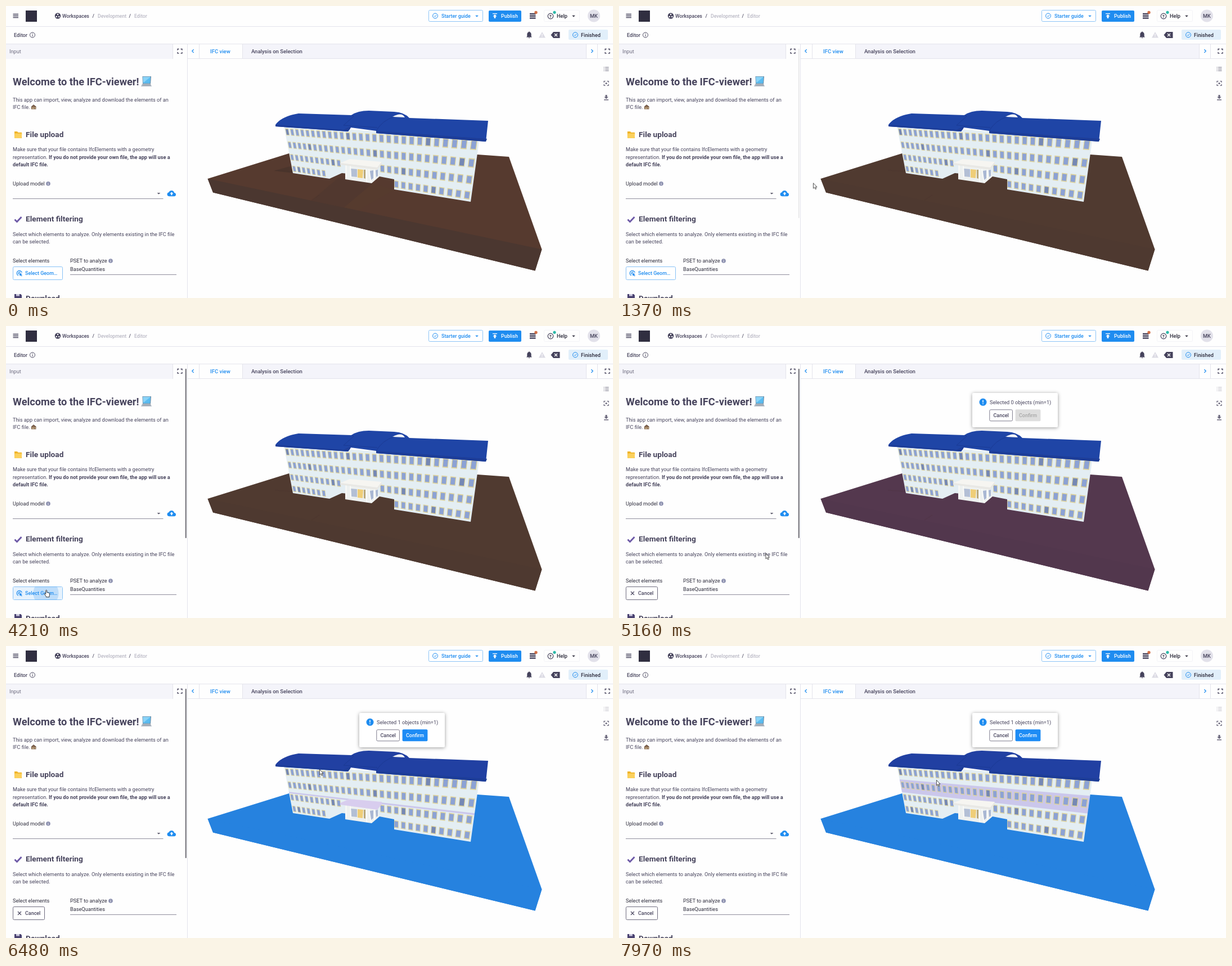
An HTML page that plays this animation: 1079x519 px, repeating every 8 s.

```html
<!DOCTYPE html>
<html lang="en">
<head>
<meta charset="utf-8">
<title>IFC viewer</title>
<style>
html, body { margin: 0; width: 100%; height: 100%; overflow: hidden; background: #fefefe; }
svg { display: block; }
text { font: 400 9.2px Roboto, sans-serif; fill: #46435c; white-space: pre; }
.b { font-weight: 700; }
.m { font-weight: 500; }
.nav { font-weight: 500; font-size: 8.7px; }
.btn { font-weight: 500; font-size: 8.95px; }
.tab { font-weight: 500; font-size: 9.5px; }
.h1 { font-weight: 700; font-size: 18.2px; }
.h2 { font-weight: 700; font-size: 13.7px; }
.k { fill: #2b2a3a; }
.w { fill: #fff; }
.blue { fill: #1e8cf0; }
.faint { fill: #b9b8c4; }
.soft { fill: #6f6d80; }
.line { fill: none; stroke: #46435c; }
.rule { stroke: #e4e4ec; }
.ink { fill: #46435c; }
.tool { opacity: .8; }

.anim { animation: 8s step-end infinite; }
#cursor { animation-name: move; }
#arrow { animation-name: arrow; }
#hand { animation-name: hand; }
#bar { animation-name: bar; animation-timing-function: linear; }
#field { animation-name: field; }
#hover { animation-name: hover; }
#ripple { animation-name: ripple; animation-timing-function: linear; }
.idle { animation-name: idle; }
.picking { animation-name: picking; }
#dialog { animation-name: dialog; animation-timing-function: linear; }
#list { animation-name: list; }
#top { animation-name: topFace; }
#side { animation-name: sideFace; }
#path { animation-name: path; }
#seams { animation-name: unpicked; }
#zero { animation-name: unpicked; }
#one { animation-name: picked; }
#confirm { animation-name: confirm; animation-timing-function: linear; }
#confirmText { animation-name: confirmText; animation-timing-function: linear; }
#slab, #canopyHover { animation-name: slab; }
#floor4 { animation-name: floor4; }
#floor3 { animation-name: floor3; }
#roof { animation-name: roof; }

@keyframes move {
  0% { transform: translate(736px, 492px); }
  3.75% { transform: translate(689px, 473px); }
  5.875% { transform: translate(689px, 473px); animation-timing-function: steps(5, jump-both); }
  10.25% { transform: translate(647px, 408px); }
  15.125% { transform: translate(393px, 324px); }
  16.06% { transform: translate(393px, 324px); animation-timing-function: steps(9, jump-both); }
  24.5% { transform: translate(153px, 276px); }
  25.5% { transform: translate(153px, 276px); animation-timing-function: steps(4, jump-both); }
  28.7% { transform: translate(130px, 312px); }
  29.75% { transform: translate(130px, 312px); animation-timing-function: steps(2, jump-both); }
  31.5% { transform: translate(127px, 316px); }
  42.375% { transform: translate(127px, 316px); animation-timing-function: steps(5, jump-both); }
  48.375% { transform: translate(71px, 469px); }
  59.375% { transform: translate(71px, 469px); animation-timing-function: steps(9, jump-both); }
  68.75% { transform: translate(450px, 339px); }
  77.625% { transform: translate(450px, 339px); animation-timing-function: steps(3, jump-both); }
  80.94% { transform: translate(557px, 219px); }
  82.15% { transform: translate(557px, 219px); animation-timing-function: steps(4, jump-both); }
  86.875% { transform: translate(561px, 198px); }
  88% { transform: translate(561px, 198px); animation-timing-function: steps(7, jump-both); }
  95% { transform: translate(563px, 232px); }
  97.25% { transform: translate(563px, 232px); animation-timing-function: steps(2, jump-both); }
  99.6%, 100% { transform: translate(564px, 238px); }
}
@keyframes arrow { 0% { opacity: 0; } .375% { opacity: 1; } 48.375% { opacity: 0; } 54.875%, 100% { opacity: 1; } }
@keyframes hand { 0% { opacity: 0; } 48.375% { opacity: 1; } 54.875%, 100% { opacity: 0; } }
@keyframes bar { 0%, 17% { opacity: 0; } 18%, 97.25% { opacity: 1; } 99.6%, 100% { opacity: 0; } }
@keyframes field { 0% { stroke: #8f8d9c; } 42.375% { stroke: #2b2a3a; } 45%, 100% { stroke: #8f8d9c; } }
@keyframes hover { 0% { opacity: 0; } 50.25%, 100% { opacity: 1; } }
@keyframes ripple {
  0%, 51.2% { r: 0px; opacity: .2; }
  52.6% { r: 22px; opacity: .2; }
  54.8%, 100% { r: 60px; opacity: 0; }
}
@keyframes idle { 0% { opacity: 1; } 54.875%, 100% { opacity: 0; } }
@keyframes picking { 0% { opacity: 0; } 54.875%, 100% { opacity: 1; } }
@keyframes dialog { 0%, 54.8% { opacity: 0; } 57.125%, 100% { opacity: 1; } }
@keyframes list { 0% { opacity: .8; } 55.5%, 100% { opacity: .35; } }
@keyframes topFace { 0% { fill: #563a2f; } 17% { fill: #503a30; } 64.4% { fill: #54384e; } 75.625%, 100% { fill: #2682df; } }
@keyframes sideFace { 0% { fill: #4b3730; } 17% { fill: #4e3930; } 64.4% { fill: #52374d; } 75.625%, 100% { fill: #2682df; } }
@keyframes path { 0% { opacity: .7; } 17%, 100% { opacity: 0; } }
@keyframes unpicked { 0% { opacity: 1; } 75.625%, 100% { opacity: 0; } }
@keyframes picked { 0% { opacity: 0; } 75.625%, 100% { opacity: 1; } }
@keyframes confirm { 0%, 75.6% { fill: #dedede; } 78.5%, 100% { fill: #1e8cf5; } }
@keyframes confirmText { 0%, 75.6% { fill: #a6a6a6; } 78.5%, 100% { fill: #fff; } }
@keyframes slab { 0% { opacity: 0; } 79.9% { opacity: 1; } 82.15%, 100% { opacity: 0; } }
@keyframes floor4 { 0% { opacity: 0; } 82.15% { opacity: 1; } 84.5% { opacity: 0; } 91% { opacity: 1; } 94%, 100% { opacity: 0; } }
@keyframes floor3 { 0% { opacity: 0; } 94%, 100% { opacity: 1; } }
@keyframes roof { 0% { fill: #1f45a6; } 75.625%, 100% { fill: #2140a2; } }
</style>
</head>
<body>
<svg width="1079" height="519" viewBox="0 0 1079 519">
  <defs>
    <g id="tick" fill="none"><circle r="4.5"/><path d="M-2 0l1.5 1.6L2.2-1.4"/></g>
    <path id="caret" d="M-2.8-1.3h5.6L0 1.6z"/>
    <path id="full" class="line" stroke-width="1.3" d="M-4-1.5V-3.8H-1.5M1.5-3.8H4V-1.5M4 1.5V3.8H1.5M-1.5 3.8H-4V1.5"/>
    <g id="info"><circle r="3.8" fill="#8b8fae"/><path d="M0-2v1M0-.3V2.2" stroke="#fff"/></g>
    <clipPath id="wallClip"><path d="M494 213L842 233 826 348 690 326V308L664 303 597 297 575 307 510 297z"/></clipPath>
    <clipPath id="buttonClip"><rect x="12" y="463" width="89" height="24" rx="2"/></clipPath>
  </defs>
  <rect width="1079" height="519" fill="#fefefe"/>

  <!-- model -->
  <g id="model">
    <path id="top" class="anim" d="M358.500 307L503 262 838 264 894 268 952.500 432.500 940.500 470.500 368 331.500z"/>
    <path id="side" class="anim" d="M358.500 307L952.500 432.500 940.500 470.500 368 331.500z"/>
    <g id="path" class="anim">
      <path d="M543 346L590 306 652 315 601 358z" fill="#4f382f"/>
      <path d="M601 358L652 315 690 327 626 363z" fill="#59402f" opacity=".35"/>
      <path d="M476 293L505 285 510 297z" fill="#47332b"/>
    </g>
    <path id="seams" class="anim" d="M543 345L557 336M478 292L509 294" stroke="#452f2b" stroke-opacity=".3" stroke-width=".7"/>
    <g clip-path="url(#wallClip)">
      <rect x="490" y="205" width="360" height="150" fill="#e4eef3"/>
      <g fill="#cbc7eb">
        <path id="slab" class="anim"/>
        <path id="floor4" class="anim"/>
        <path id="floor3" class="anim"/>
      </g>
      <path id="frames" fill="#ddd29c"/>
      <path id="panes" fill="#8ca2d4"/>
      <path id="darkPanes" fill="#7588b4"/>
    </g>
    <!-- entrance -->
    <path d="M603 284L660 289 664 303 650 315 603 308z" fill="#eef1f0"/>
    <path d="M613 289L624 290V304L614 303z" fill="#b3bfd5"/>
    <path d="M625 290L635 291 634 306 625 305z" fill="#efce78"/>
    <path d="M636 291L639 291V307L636 306z" fill="#b9a878"/>
    <path d="M647 293L653 292V306L648 310zM657 292L661 291V302L658 304z" fill="#a9b7d3"/>
    <path d="M604.500 282V305M612 284L613 305M641 290V313M645 290L649 314M655 289V309" stroke="#fafaf8" stroke-width="2"/>
    <path d="M594 279L611 272 668 277 660 287z" fill="#f6f5f1"/>
    <path d="M594 279L660 287 668 277V281L660 291 594 282z" fill="#e9e8e4"/>
    <path id="canopyHover" class="anim" d="M594 279L611 272 668 277V281L660 291 594 282z" fill="#d8cdee"/>
    <!-- roof -->
    <path id="roof" class="anim" d="M479 211Q490 196 520 191L614 194Q625 186 645 186L690 188Q708 189 717 199L857 204 853 241 658 226V222L613 216 608 223 479 214z"/>
    <path d="M687 197Q697 191 704 193 708 195 709 198z" fill="#f3f5f8"/>
    <path d="M479 211L600 220 613 214 612 218 608 223 479 214zM658 222L855 236 853 241 658 226z" fill="#1d3d98"/>
    <path d="M614 194L618 196 600 212 660 216M658 222Q669 203 690 197" fill="none" stroke="#1a3890" stroke-width=".8"/>
  </g>

  <!-- top bar -->
  <path class="line" d="M12.500 14.500h9.500m-9.500 3h9.500m-9.500 3h9.500" stroke-width="1.3"/>
  <rect x="35" y="8" width="20" height="20" fill="#302e40"/>
  <circle class="ink" cx="92" cy="17.5" r="5.2"/>
  <g class="w"><circle cx="92" cy="15" r="1.3"/><circle cx="89.8" cy="19" r="1.3"/><circle cx="94.2" cy="19" r="1.3"/></g>
  <text class="nav" x="100" y="20.6">Workspaces</text>
  <text class="nav" x="153.5" y="20.6">/</text>
  <text class="nav faint" x="163" y="20.6">Development</text>
  <text class="nav" x="218.5" y="20.6">/</text>
  <text class="nav faint" x="228" y="20.6">Editor</text>
  <rect x="751.5" y="7.5" width="96" height="20" rx="2" fill="#fff" stroke="#8cc4f6"/>
  <use href="#tick" x="763" y="17.5" stroke="#1e8cf0"/>
  <text class="btn blue" x="774" y="20.6">Starter guide</text>
  <use href="#caret" class="blue" x="837" y="18"/>
  <rect class="blue" x="858" y="8" width="58" height="20" rx="2"/>
  <path class="w" d="M865 13h8v1.3h-8zM869 15l3.600 3.600h-2.200v3.200h-2.800v-3.200h-2.200z"/>
  <text class="btn w" x="880" y="20.6">Publish</text>
  <path class="line" d="M931 14h10.500M931 17.800h10.500M931 21.600h10.500" stroke-width="2.5"/>
  <circle cx="942" cy="11.5" r="2.7" fill="#d0714a"/>
  <rect x="956.5" y="7.5" width="63" height="20" rx="2" fill="none" stroke="#f3f3f7"/>
  <circle class="line" cx="968" cy="18" r="4.8" stroke-width="1.2"/>
  <text class="b k" x="965.8" y="21" style="font-size:8px">?</text>
  <circle cx="975" cy="11.3" r="2.6" fill="#2bb8a8"/>
  <text class="m k" x="979" y="20.8">Help</text>
  <use href="#caret" class="k" x="1009" y="18"/>
  <circle cx="1045" cy="17.5" r="11" fill="#e2e1ea"/>
  <text class="m" x="1045" y="21" text-anchor="middle">MK</text>
  <path class="rule" d="M0 36.500h1079M0 67.500h1079"/>

  <!-- sub bar -->
  <text class="m" x="14" y="54.6">Editor</text>
  <circle class="line" cx="47" cy="51.5" r="4.5"/>
  <path class="line" d="M47 49v1.200M47 51v3"/>
  <path class="ink" d="M925 55.500l1.300-1.600V50.500Q926.400 47 929.200 46.300V45.400h1.600v.9Q933.600 47 933.700 50.500v3.400l1.300 1.600zM928.600 56.300h2.800q-1.400 2.200-2.800 0z"/>
  <path d="M953 46l6 10.500h-12z" fill="#dcdbe4"/>
  <path d="M953 49.500v3.300M953 53.800v1.300" stroke="#fff" stroke-width="1.2"/>
  <path class="ink" d="M973 46h11.500v11H973l-4.500-5.500z"/>
  <path d="M975 49l5 5m0-5l-5 5" stroke="#fff" stroke-width="1.3"/>
  <rect x="1000" y="42" width="70" height="18" rx="2" fill="#e1effa"/>
  <use href="#tick" x="1012" y="51.3" stroke="#1e8cf0"/>
  <text class="m k" x="1022" y="54.6">Finished</text>

  <!-- panel heads -->
  <rect y="68" width="296" height="26" fill="#f5f5fa"/>
  <rect x="420" y="68" width="611" height="25" fill="#f4f4fa"/>
  <path class="rule" d="M296.500 68v26M322.500 68v451M343.500 68v25M420.500 68v25M1031.500 68v25M1051.500 68v25M323 93.500h756"/>
  <text class="soft" x="6" y="83.6">Input</text>
  <use href="#full" x="309" y="80.3"/>
  <use href="#full" x="1069" y="80.3"/>
  <path d="M333.600 77.200l-2.800 2.900 2.800 2.900M1040.400 77.200l2.800 2.900-2.800 2.900" fill="none" stroke="#1e8cf0" stroke-width="1.3"/>
  <text class="tab blue" x="363" y="83.6">IFC view</text>
  <text class="tab" x="436" y="83.6">Analysis on Selection</text>
  <path id="list" class="line anim" d="M1062.500 109h1.300m1.200 0h6.500M1062.500 112h1.300m1.200 0h6.500M1062.500 115h1.300m1.200 0h6.500" stroke-width="1.1"/>
  <g class="tool">
    <use href="#full" x="1067" y="137.5"/>
    <circle class="ink" cx="1067" cy="137.5" r="1.6"/>
    <path class="ink" d="M1065.500 158h3v3.500h2.200l-3.700 3.700-3.700-3.700h2.200zM1063 166h8v1.400h-8z"/>
  </g>

  <!-- input panel -->
  <text class="h1" x="12" y="140.8">Welcome to the IFC-viewer!</text>
  <path d="M242.500 125h15.500l-1 13.500h-14z" fill="#66788c"/>
  <path d="M243.300 125.800h13.800l-.8 11.600h-12.600z" fill="#5bbcf0"/>
  <path d="M243.300 125.800h13.800l-13.400 11z" fill="#8ad3f7"/>
  <path d="M242 138.500h15l2 4.500h-19z" fill="#b4bcc6"/>
  <path d="M243 140.300h14" stroke="#84909d"/>
  <text x="12" y="169.5">This app can import, view, analyze and download the elements of an</text>
  <text x="12" y="182.5">IFC file.</text>
  <path d="M45 179l4-3.500 4.500 3.500v4.500H45z" fill="#8a6a50"/>
  <path d="M45 179.300l4-3.500 4.500 3.500" fill="none" stroke="#5a4840"/>
  <path d="M47 180h2v3.500h-2zM50.500 180h2v2h-2z" fill="#c9b58f"/>

  <path d="M15 223h5l1.500 1.800H28V235H15z" fill="#f0b429"/>
  <path d="M15.500 226.500h13L27.500 235H15z" fill="#fbd05c"/>
  <text class="h2" x="35" y="233">File upload</text>
  <text x="12" y="258.3">Make sure that your file contains IfcElements with a geometry</text>
  <text x="12" y="271.5">representation. <tspan class="b">If you do not provide your own file, the app will use a</tspan></text>
  <text class="b" x="12" y="284.8">default IFC file.</text>
  <text class="k" x="12" y="319">Upload model</text>
  <use href="#info" x="75" y="315.8"/>
  <path id="field" class="anim" d="M12 342.500h267.500"/>
  <use href="#caret" x="271.5" y="333.2" fill="#5c5a6c"/>
  <path class="blue" d="M290 338.300Q286.500 338 286.500 334.600 286.700 331.600 289.500 331.200 290.800 328 294.300 328 298.200 328.200 299 331.900 302 332.300 302 335.200 301.800 338.200 299 338.300z"/>
  <path class="w" d="M294.400 330.500l3 3.200h-1.900v2.600h-2.200v-2.600h-1.900z"/>

  <path d="M15.500 379.500l4 4 8-8.500" fill="none" stroke="#6c58a6" stroke-width="2.8"/>
  <text class="h2" x="35" y="383">Element filtering</text>
  <text x="12" y="408.5">Select which elements to analyze. Only elements existing in the IFC file</text>
  <text x="12" y="421.5">can be selected.</text>
  <text class="k" x="12" y="456">Select elements</text>
  <text class="k" x="114" y="456">PSET to analyze</text>
  <use href="#info" x="186" y="453"/>
  <text class="k" x="114" y="471.3">BaseQuantities</text>
  <path d="M114 477.500h189" stroke="#8f8d9c"/>

  <g class="idle anim">
    <rect x="12.5" y="463.5" width="88" height="23" rx="2" fill="#fff" stroke="#86c1f6"/>
    <g clip-path="url(#buttonClip)">
      <rect id="hover" class="anim" x="13" y="464" width="87" height="22" fill="#e6f2fd"/>
      <circle id="ripple" class="anim" cx="71" cy="475" fill="#1e8cf0"/>
    </g>
    <path d="M22 479.200A4.600 4.600 0 1 1 28.300 474M22.700 476.800A2.200 2.200 0 1 1 25.800 473.600" fill="none" stroke="#1e8cf0" stroke-width="1.2"/>
    <path class="blue" d="M23.500 474.500l5.500 2-2.200 1 2 2-1 1-2-2-1 2z"/>
    <text class="btn blue" x="34" y="478.2">Select Geom…</text>
  </g>
  <g class="picking anim">
    <rect x="12.5" y="463.5" width="56" height="23" rx="2" fill="#fff" stroke="#6d6b7e"/>
    <path class="line" d="M21 472l6 6m0-6l-6 6" stroke-width="1.1"/>
    <text class="btn" x="34" y="478.2">Cancel</text>
  </g>
  <path d="M15 512h11l2 2v8H15z" fill="#4a4270"/>
  <path d="M18 512h6v3.500h-6z" fill="#c9c6dc"/>
  <text class="h2" x="35" y="524">Download</text>
  <rect id="bar" class="anim" x="318.8" y="76" width="1.9" height="301" rx=".8" fill="#66656d"/>

  <!-- selection dialog -->
  <g id="dialog" class="anim">
    <rect x="628" y="119" width="152" height="61" rx="2" fill="#fff" style="filter:drop-shadow(0 1.5px 3px rgba(0,0,0,.4))"/>
    <circle class="blue" cx="647" cy="135.3" r="6.5"/>
    <path d="M647 131.500v4.500M647 137.300v1.600" stroke="#fff" stroke-width="1.4"/>
    <text id="zero" class="anim" x="659" y="138.6">Selected 0 objects (min=1)</text>
    <text id="one" class="anim" x="659" y="138.6">Selected 1 objects (min=1)</text>
    <rect x="658.8" y="148.8" width="40.6" height="20" rx="2" fill="#fff" stroke="#7d7b8c"/>
    <text class="btn" x="665.5" y="162.2">Cancel</text>
    <rect id="confirm" class="anim" x="704.6" y="148.3" width="44.8" height="21" rx="2"/>
    <text id="confirmText" class="btn anim" x="711" y="162.2">Confirm</text>
  </g>

  <g id="cursor" class="anim">
    <path id="arrow" class="anim" d="M.4.4V9.800L2.600 7.800 4.100 11.200 5.700 10.500 4.200 7.300H7z" fill="#fff" stroke="#222" stroke-width=".8"/>
    <path id="hand" class="anim" d="M-.3 1Q.7-.6 1.700 1V4.500L5.800 5.400Q7 5.800 6.800 7.200L6 10.500V12.800H.3V11.500L-2.600 7.600Q-2.700 6.200-1.300 6.600L-.3 7.600z" fill="#fff" stroke="#222" stroke-width=".9"/>
  </g>
</svg>
<script>
const setPath = (id, d) => document.getElementById(id).setAttribute('d', d);

// Perspective map from the unit square to the facade corners.
function project([[x0, y0], [x1, y1], [x2, y2], [x3, y3]]) {
  const ax = x1 - x2, bx = x3 - x2, sx = x0 - x1 + x2 - x3;
  const ay = y1 - y2, by = y3 - y2, sy = y0 - y1 + y2 - y3;
  const det = ax * by - bx * ay;
  const g = (sx * by - bx * sy) / det, h = (ax * sy - sx * ay) / det;
  return (u, v) => {
    const w = 1 + g * u + h * v;
    return [
      (x0 + (x1 - x0 + g * x1) * u + (x3 - x0 + h * x3) * v) / w,
      (y0 + (y1 - y0 + g * y1) * u + (y3 - y0 + h * y3) * v) / w
    ];
  };
}

const facade = project([[494, 214], [842, 234], [826, 348], [510, 297]]);
const quad = (u0, v0, u1, v1) =>
  'M' + [[u0, v0], [u1, v0], [u1, v1], [u0, v1]]
    .map(([u, v]) => facade(u, v).map(n => n.toFixed(2)).join(' ')).join('L') + 'z';

setPath('slab', quad(0, .525, 1, .555));
setPath('floor4', quad(0, 0, 1, .25));
setPath('floor3', quad(0, .26, 1, .53));

const columns = 28;
const rows = [.108, .374, .637, .895];
const gaps = { 2: [593, 668], 3: [570, 692] };
const glass = { frames: '', panes: '', darkPanes: '' };
rows.forEach((v, r) => {
  for (let i = 0; i < columns; i++) {
    const u = (i + .5) / columns;
    const x = facade(u, v)[0], gap = gaps[r];
    if (gap && x > gap[0] && x < gap[1]) continue;
    const box = (du, dv) => quad(u - du / columns, v - dv, u + du / columns, v + dv);
    glass.frames += box(.32, .07);
    glass[(i * 7 + r * 5) % 11 ? 'panes' : 'darkPanes'] += box(.245, .055);
  }
});
for (const id in glass) setPath(id, glass[id]);
</script>
</body>
</html>
```
